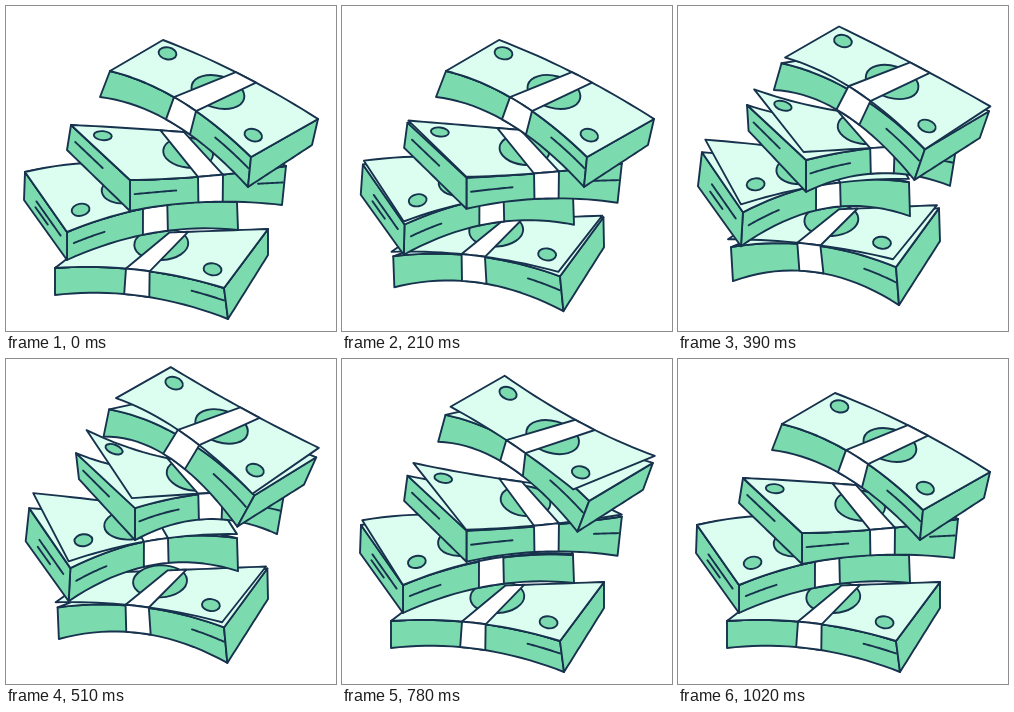
An HTML page with a canvas that plays this animation: 330x325 px, repeating every 1.05 s.

```html
<!DOCTYPE html>
<html lang="en">
<head>
<meta charset="utf-8">
<title>Stacks of banknotes</title>
<style>
html, body { margin: 0; width: 100%; height: 100%; overflow: hidden; background: #fff; }
canvas { display: block; width: 330px; height: 325px; }
</style>
</head>
<body>
<canvas id="stage"></canvas>
<script>
const W = 330, H = 325, LOOP = 1050, STEP = 30;
const INK = '#17324d', MINT = '#dcfef0', GREEN = '#7bdbae', WHITE = '#fff';
const canvas = document.getElementById('stage');
const ctx = canvas.getContext('2d');
const ratio = window.devicePixelRatio || 1;
canvas.width = W * ratio;
canvas.height = H * ratio;

// top: corners a b c d; a-b is the long front edge, b the near corner.
// base: the corners below a b c.
// hop, flap, curl: [start, length] of the jump, of the loose top note, of its near corner.
// lean: sideways shift of the top and base corners during the jump.
// bend: [at rest, change] for the note, stack, base and back edges.
// spots: [along, across, rx, ry, degrees]; marks: [face, from, to, depth].
const stacks = [
  {
    top: [[49, 262], [218, 282], [262, 223], [92, 229]],
    base: [[49, 289], [222, 313], [262, 249]],
    hop: [25, 690], flap: [25, 690], curl: [25, 690],
    lift: 21, baseLift: 14,
    lean: [[4, 0, -1], [6, -1, 0]],
    loose: [[-3, -8], [-3, -8], [-2, -3], [-2, -2]],
    bend: { note: [-8, 3], stack: [-8, -4], base: [-11, -10], back: [0, 0] },
    band: { front: [.42, .56], base: [.4, .545], back: [.42, .53] },
    spots: [[.454, .68, 27, 16, -3], [.87, .24, 9, 6, 8]],
    marks: [['front', .8, .99, .42]]
  },
  {
    top: [[231, 196], [61, 226], [19, 166], [222, 178]],
    base: [[232, 224], [61, 254], [18, 194]],
    hop: [60, 715], flap: [60, 890], curl: [60, 715],
    lift: 20, baseLift: 14,
    lean: [[0, 4, 5], [0, 2, 2]],
    loose: [[0, -4], [-2, -8], [4, -15], [0, 0]],
    bend: { note: [-10, 3], stack: [-10, -4], base: [-12, -11], back: [-15, 14] },
    band: { front: [.41, .553], base: [.41, .556], back: [.4, .53] },
    spots: [[.57, .45, 26, 15, -8], [.867, .24, 9, 6, -12]],
    marks: [['side', .15, .72, .45], ['side', .45, .74, .7], ['front', .78, .96, .5]]
  },
  {
    top: [[280, 160], [124, 174], [65, 119], [222, 130]],
    base: [[276, 199], [124, 205], [61, 144]],
    hop: [140, 710], flap: [125, 885], curl: [140, 710],
    lift: 25, baseLift: 24,
    lean: [[-2, 5, 5], [-5, 5, 12]],
    loose: [[0, -4], [-3, -10], [11, -24], [0, 0]],
    bend: { note: [3, -4], stack: [3, -11], base: [-6, -12], back: [-1, 10] },
    band: { front: [.404, .564], base: [.39, .55], back: [.28, .43] },
    spots: [[.44, .5, 25, 15, 6], [.865, .82, 9, 4.5, 5]],
    marks: [['side', .45, .9, .45], ['front', .7, .97, .47], ['front', .01, .17, .42]]
  },
  {
    top: [[104, 65], [245, 151], [312, 113], [157, 34]],
    base: [[94, 91], [242, 181], [306, 139]],
    hop: [200, 790], flap: [200, 820], curl: [450, 540],
    lift: 16.5, baseLift: 15,
    lean: [[-1, 4, -2], [4, -12, -9]],
    loose: [[8, -13], [-18, -13], [3, -11], [9, -13]],
    bend: { note: [-13, 10], stack: [-13, -2], base: [-18, -6], back: [-5, 15] },
    band: { front: [.454, .61], base: [.446, .608], back: [.47, .6] },
    spots: [[.55, .5, 27, 16, 15], [.11, .77, 9, 6, 10], [.9, .25, 9, 6, 18]],
    marks: [['front', .76, .99, .42]]
  }
];

// Smooth swell from 0 to 1 and back.
function swell(time, [start, length]) {
  const x = (time - start) / length;
  return x > 0 && x < 1 ? Math.sin(Math.PI * x) ** 2 : 0;
}

const mix = (p, q, k) => [p[0] + (q[0] - p[0]) * k, p[1] + (q[1] - p[1]) * k];

// Parabolic edge: bend is the vertical offset at its middle.
const edge = (p, q, bend = 0) => t => {
  const m = mix(p, q, t);
  return [m[0], m[1] + bend * 4 * t * (1 - t)];
};

function shape(item, time) {
  const hop = swell(time, item.hop);
  const flap = swell(time, item.flap);
  const curl = swell(time, item.curl);
  const raise = (list, lift, lean) =>
    list.map(([x, y], i) => [x + (lean[i] || 0) * hop, y - lift * hop]);
  const bent = (name, k) => item.bend[name][0] + item.bend[name][1] * k;

  const body = raise(item.top, item.lift, item.lean[0]);
  const base = raise(item.base, item.baseLift, item.lean[1]);
  const note = body.map(([x, y], i) => {
    const k = i === 1 ? curl : flap;
    return [x + item.loose[i][0] * k, y + item.loose[i][1] * k];
  });
  const [a, b, c, d] = note;
  const backBend = bent('back', (flap + curl) / 2);
  const front = edge(a, b, bent('note', curl));
  const back = edge(d, c, backBend);
  return {
    front, back,
    stack: edge(body[0], body[1], bent('stack', hop)),
    stackBack: edge(mix(d, b, .2), body[2], backBend),
    base: edge(base[0], base[1], bent('base', hop)),
    side: edge(body[1], body[2]),
    baseSide: edge(base[1], base[2]),
    on: (u, v) => mix(front(u), back(u), v)
  };
}

const points = (curve, from, to, n = 20) =>
  Array.from({ length: n + 1 }, (_, i) => curve(from + (to - from) * i / n));

const strip = (top, low) => [...points(top, 0, 1), ...points(low, 1, 0)];

function trace(list) {
  ctx.beginPath();
  list.forEach(([x, y]) => ctx.lineTo(x, y));
}

function paint(colour) {
  ctx.fillStyle = colour;
  ctx.fill();
  ctx.stroke();
}

function fill(list, colour) {
  trace(list);
  ctx.closePath();
  paint(colour);
}

function tilt(s, u, v) {
  const p = s.on(u - .01, v), q = s.on(u + .01, v);
  return Math.atan((q[1] - p[1]) / (q[0] - p[0]));
}

function drawStack(item, time) {
  const s = shape(item, time);
  const rest = shape(item, 0);
  const { front, base, back } = item.band;

  fill(strip(s.stack, s.base), GREEN);
  fill(strip(s.side, s.baseSide), GREEN);
  for (const [face, from, to, depth] of item.marks) {
    const [top, low] = face === 'front' ? [s.stack, s.base] : [s.side, s.baseSide];
    trace(points(t => mix(top(t), low(t), depth), from, to));
    ctx.stroke();
  }
  fill(strip(s.stack, s.stackBack), MINT);
  fill(strip(s.front, s.back), MINT);

  for (const [u, v, rx, ry, deg] of item.spots) {
    const [x, y] = s.on(u, v);
    const turn = deg * Math.PI / 180 + tilt(s, u, v) - tilt(rest, u, v);
    ctx.beginPath();
    ctx.ellipse(x, y, rx, ry, turn, 0, 2 * Math.PI);
    paint(GREEN);
  }

  const fold = points(s.front, front[0], front[1], 6);
  fill([...fold, ...points(s.back, back[1], back[0], 6)], WHITE);
  fill([...fold, ...points(s.base, base[1], base[0], 6)], WHITE);
}

function draw(time) {
  ctx.setTransform(ratio, 0, 0, ratio, 0, 0);
  ctx.fillStyle = WHITE;
  ctx.fillRect(0, 0, W, H);
  ctx.strokeStyle = INK;
  ctx.lineWidth = 1.9;
  ctx.lineJoin = ctx.lineCap = 'round';
  stacks.forEach(s => drawStack(s, time));
}

let start = null;
function tick(now) {
  if (start === null) start = now;
  const time = Math.max(0, now - start) % LOOP;
  draw(Math.floor(time / STEP) * STEP);
  requestAnimationFrame(tick);
}
draw(0);
requestAnimationFrame(tick);
</script>
</body>
</html>
```
